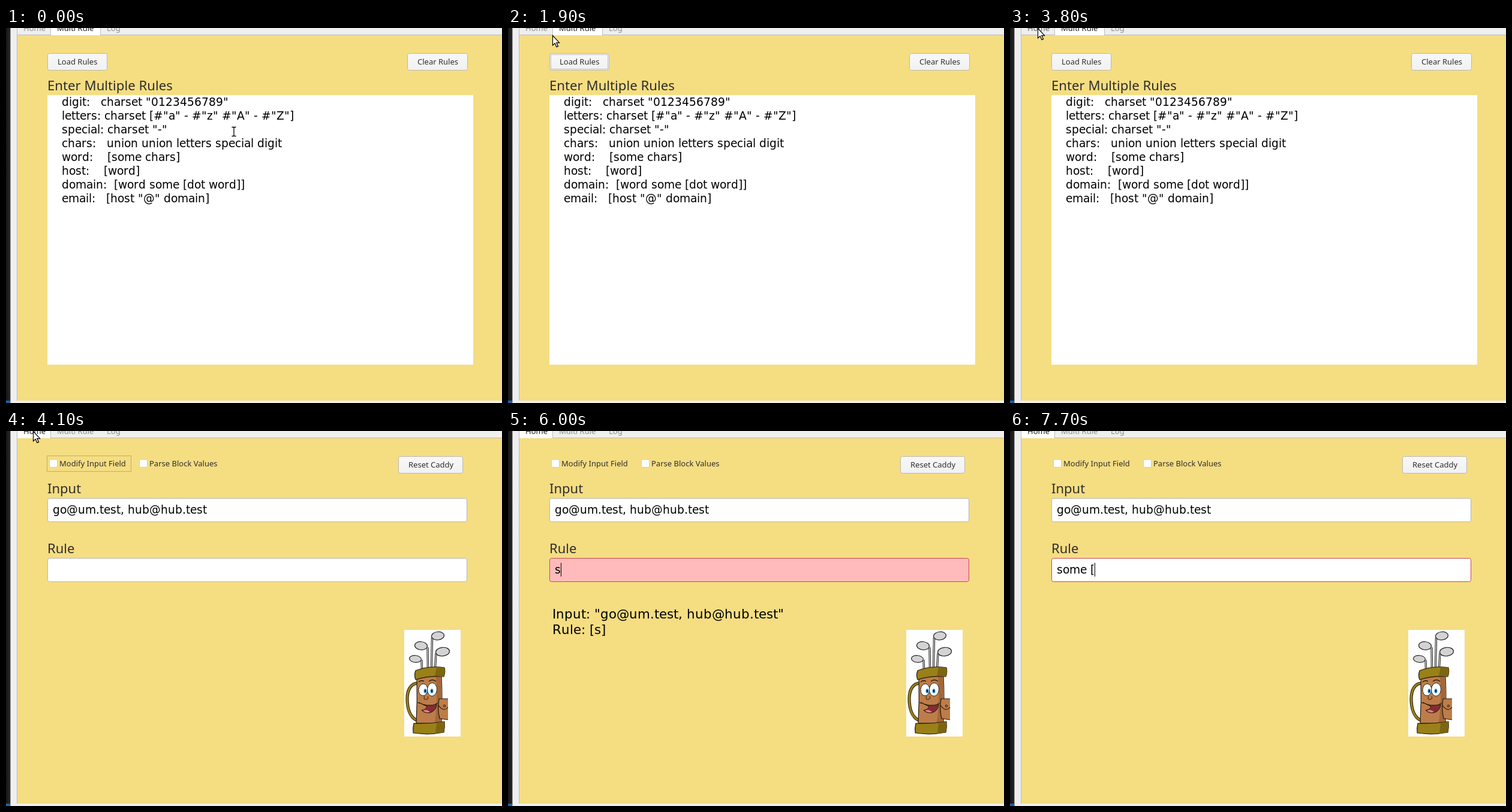
These frames come from a looping animation (827 px wide and 626 px high, 8 s). An HTML page with a canvas:

```html
<!DOCTYPE html>
<html lang="en">
<head>
<meta charset="utf-8">
<title>Rule tester</title>
<style>
html, body { margin: 0; width: 100%; height: 100%; overflow: hidden; }
canvas { display: block; }
</style>
</head>
<body>
<canvas id="stage" width="827" height="626"></canvas>
<script>
const ctx = document.getElementById('stage').getContext('2d');
const LOOP = 8000;
const STEP = 100;
const YELLOW = '#f5dd82';
const PANEL = '#efefef';
const UI = '"Noto Sans", "Open Sans", sans-serif';
const BODY = '"DejaVu Sans", sans-serif';
const ADDRESSES = 'go@um.test, hub@hub.test';

const RULES = [
  'digit:   charset "0123456789"',
  'letters: charset [#"a" - #"z" #"A" - #"Z"]',
  'special: charset "-"',
  'chars:   union union letters special digit',
  'word:    [some chars]',
  'host:    [word]',
  'domain:  [word some [dot word]]',
  'email:   [host "@" domain]'
];

// time, x, y of the pointer's hot spot
const POINTER = [
  [0, 380, 173], [200, 380, 173], [1000, 87, 1], [1200, 87, 1],
  [1600, 92, 45], [1900, 74, 12], [2100, 65, 9], [2400, 46, 1],
  [2700, 46, 1], [3100, 86, 3], [3500, 51, 1], [3700, 51, 1],
  [3800, 46, 0], [4000, 46, 0], [4100, 45, 0], [4300, 45, 0],
  [4700, 143, 221], [4800, 143, 221], [5000, 142, 225], [LOOP, 142, 225]
];

// time at which the rule field starts to show each text
const TYPED = [[0, ''], [6000, 's'], [6200, 'so'], [6400, 'som'],
  [6500, 'some'], [6800, 'some '], [7500, 'some [']];

const clamp = v => Math.max(0, Math.min(1, v));

function rect(x, y, w, h, color) {
  ctx.fillStyle = color;
  ctx.fillRect(x, y, w, h);
}

function box(x, y, w, h, fill, border, radius = 3) {
  ctx.beginPath();
  ctx.roundRect(x + 0.5, y + 0.5, w - 1, h - 1, radius);
  ctx.fillStyle = fill;
  ctx.fill();
  ctx.strokeStyle = border;
  ctx.lineWidth = 1;
  ctx.stroke();
}

function label(text, x, y, size = 13, color = '#2e2e2e') {
  ctx.font = `${size}px ${UI}`;
  ctx.fillStyle = color;
  ctx.fillText(text, x, y);
}

// Body text advances by whole pixels; returns the end position.
function bodyText(text, x, y, size = 18.67) {
  ctx.font = `${size}px ${BODY}`;
  ctx.fillStyle = '#000';
  for (const ch of text) {
    ctx.fillText(ch, x, y);
    x += Math.round(ctx.measureText(ch).width);
  }
  return x;
}

function dotted(x, y, w, h, color) {
  ctx.save();
  ctx.setLineDash([1, 1]);
  ctx.strokeStyle = color;
  ctx.lineWidth = 1;
  ctx.strokeRect(x + 0.5, y + 0.5, w - 1, h - 1);
  ctx.restore();
}

function button(text, x, w, hover) {
  const shade = ctx.createLinearGradient(0, 42, 0, 71);
  shade.addColorStop(0, hover ? '#fcfcfc' : '#f8f8f8');
  shade.addColorStop(1, hover ? '#f6f6f6' : '#f1f1f1');
  box(x, 42, w, 29, shade, '#bbb8b0');
  label(text, x + 17, 61);
}

function drawWindow(home, pointer) {
  rect(0, 0, 827, 626, PANEL);
  const dark = ctx.createLinearGradient(0, 0, 7, 0);
  dark.addColorStop(0, '#141517');
  dark.addColorStop(1, '#29292b');
  rect(0, 0, 7, 626, dark);
  rect(0, 622, 7, 4, '#1763ad');
  rect(7, 0, 1, 626, '#a2a2a2');
  rect(18, 11, 809, 611, YELLOW);
  rect(18, 0, 1, 622, '#bdbdbd');
  rect(18, 11, 809, 1, '#bdbdbd');

  const [left, right] = home ? [18, 74] : [74, 157];
  rect(left, 0, right - left, 12, '#fff');
  rect(left, 0, 1, 12, '#bdbdbd');
  rect(right, 0, 1, 12, '#bdbdbd');
  const idle = '#8d8d8d';
  const hover = pointer.y < 11 && pointer.x < 74;
  label('Home', 29, 5, 13, home ? '#222' : hover ? '#666' : idle);
  label('Multi Rule', 85, 5, 13, home ? idle : '#222');
  label('Log', 168, 5, 13, idle);
}

function drawRulesPage(t, pointer) {
  const hover = pointer.y > 41 && pointer.y < 71 && pointer.x > 69 && pointer.x < 169;
  button('Load Rules', 69, 100, hover);
  if (t >= 1600 && t < 3100) dotted(71, 44, 96, 25, '#8a8a8a');
  button('Clear Rules', 669, 101, false);
  label('Enter Multiple Rules', 69, 104, 22.2);
  rect(69, 112, 710, 450, '#fff');
  RULES.forEach((rule, i) => bodyText(rule, 93, 130 + i * 23));
}

function drawHomePage(t) {
  const focused = t >= 5000;
  if (!focused) dotted(68, 41, 141, 27, '#94803e');
  box(72, 47, 14, 14, '#fff', '#d9cfa8', 2);
  label('Modify Input Field', 89, 59);
  box(222, 47, 14, 14, '#fff', '#d9cfa8', 2);
  label('Parse Block Values', 239, 59);
  button('Reset Caddy', 654, 108, false);

  label('Input', 69, 104, 22);
  box(69, 112, 700, 40, '#fff', '#b9b6ad');
  bodyText(ADDRESSES, 78, 138);

  label('Rule', 69, 204, 22);
  const step = start => clamp((t - start + STEP) / 300);
  const alarm = t < 6000 ? 0 : t < 7500 ? step(6000) : 1 - step(7500);
  const pale = Math.round(255 - 204 * alarm);
  box(69, 212, 700, 40, `rgb(255,${pale},${pale})`, focused ? '#c34b4f' : '#b9b6ad');
  const typed = TYPED.filter(([start]) => t >= start).pop()[1];
  const end = bodyText(typed, 78, 238);
  if (focused) rect(end, 220, 1, 23, '#000');

  if (typed && t < 7500) {
    bodyText(`Input: "${ADDRESSES}"`, 74, 313, 21.33);
    bodyText(`Rule: [${typed.trim()}]`, 74, 339, 21.33);
  }
  drawMascot();
}

function shape(path, fill, width = 1.2, stroke = '#24180c') {
  const p = new Path2D(path);
  if (fill) {
    ctx.fillStyle = fill;
    ctx.fill(p);
  }
  if (width) {
    ctx.strokeStyle = stroke;
    ctx.lineWidth = width;
    ctx.stroke(p);
  }
}

function oval(x, y, rx, ry, fill, angle = 0, width = 1.2) {
  ctx.beginPath();
  ctx.ellipse(x, y, rx, ry, angle, 0, Math.PI * 2);
  ctx.fillStyle = fill;
  ctx.fill();
  if (!width) return;
  ctx.strokeStyle = '#222';
  ctx.lineWidth = width;
  ctx.stroke();
}

function drawMascot() {
  const olive = '#998018';
  const brown = '#bd7d49';
  const shade = '#a4673a';
  rect(664, 332, 94, 178, '#fff');

  for (const shaft of ['M710.5 345L709.5 396', 'M703 361L703.5 396', 'M717 371L715.5 396', 'M693 382L693.5 398']) {
    shape(shaft, null, 3.4, '#222');
    shape(shaft, null, 1.4, '#ddd');
  }
  oval(720, 342, 10.5, 6.8, '#d3d3d3', -0.1);
  oval(692, 358.5, 10.5, 6.8, '#d3d3d3', 0.1);
  oval(728, 368.5, 11.5, 7.2, '#d3d3d3', -0.1);
  oval(682.5, 380.5, 10, 5.8, '#d3d3d3', 0.1);

  const strap = 'M687 421C674 421 669 434 669 447C669 464 674 478 685 483';
  shape(strap, null, 5.2, '#24180c');
  shape(strap, null, 3.2, olive);

  shape('M685 411L726 407Q728 450 726 488L684 488Q686 450 685 411Z', brown);
  shape('M717 409L726 408Q728 450 726 487L715 487Q720 448 717 409Z', shade, 0);
  shape('M683 400Q706 391 731 395Q733 402 730 410Q706 408 683 415Q680 408 683 400Z', olive);
  shape('M718 394L731 395Q733 402 730 410L715 409Z', '#7c6611', 0);
  shape('M680 488Q706 489 731 485Q732 494 730 503Q705 508 679 504Q678 496 680 488Z', olive);
  shape('M718 487L731 485Q732 494 730 503L716 505Z', '#7c6611', 0);

  shape('M737 447L722 447Q719 464 723 480L737 482Z', brown, 0);
  shape('M737 447L722 447Q719 464 723 480L737 482', null);
  shape('M721 458Q730 470 737 461', null);
  oval(731, 459, 1.8, 1.8, shade, 0, 0.9);

  oval(695.5, 432, 7.5, 10, '#fff', 0.05, 1);
  oval(710.5, 431.5, 8, 11, '#fff', 0.05, 1);
  for (const [x, y] of [[699, 434], [710, 434]]) {
    oval(x, y, 2.5, 3.8, '#2f8fce', 0, 0);
    oval(x, y, 1.2, 2, '#111', 0, 0);
  }
  shape('M688 419Q692 415 697 418M705 418Q711 413 717 418', null, 1.4);
  shape('M698 443Q695 449 701 448Q705 447 703 443', null, 1);
  shape('M688 453Q702 461 718 456Q717 468 706 470.5Q697 471 693 466Q699 466 702 460Z', '#842c35', 1);
  shape('M695 467Q701 463 707 469Q701 471.5 695 467Z', '#e77d83', 0);
  shape('M686 453Q688 455 690 454M716 455Q718 456 720 454', null, 1);
}

function pointerAt(t) {
  const i = Math.max(1, POINTER.findIndex(key => key[0] >= t));
  const [t0, x0, y0] = POINTER[i - 1];
  const [t1, x1, y1] = POINTER[i];
  const p = clamp((t - t0) / (t1 - t0));
  const e = p * p * (3 - 2 * p);
  return { x: Math.round(x0 + (x1 - x0) * e), y: Math.round(y0 + (y1 - y0) * e) };
}

function drawPointer({ x, y }, home, t) {
  if (t >= 6000) return;
  const inEntry = (y > 112 && y < 152) || (y > 212 && y < 252);
  const overText = x > 69 && (home ? inEntry : y > 112);
  ctx.save();
  ctx.translate(x, y);
  if (overText) {
    const beam = 'M-3.5 -7.5H-1L0 -6.5L1 -7.5H3.5M0 -6.5V6.5M-3.5 7.5H-1L0 6.5L1 7.5H3.5';
    shape(beam, null, 3, '#fff');
    shape(beam, null, 1.3, '#000');
  } else {
    shape('M0.5 0.5V17L4.2 13.6L7 19.6L9.6 18.4L6.8 12.6H11.6Z', '#fff', 1.2, '#000');
  }
  ctx.restore();
}

function draw(now) {
  const t = Math.floor((now % LOOP) / STEP) * STEP;
  const home = t >= 4100;
  const pointer = pointerAt(t);
  drawWindow(home, pointer);
  if (home) drawHomePage(t);
  else drawRulesPage(t, pointer);
  drawPointer(pointer, home, t);
}

const began = performance.now();
function frame() {
  draw(performance.now() - began);
  requestAnimationFrame(frame);
}
frame();
</script>
</body>
</html>
```
